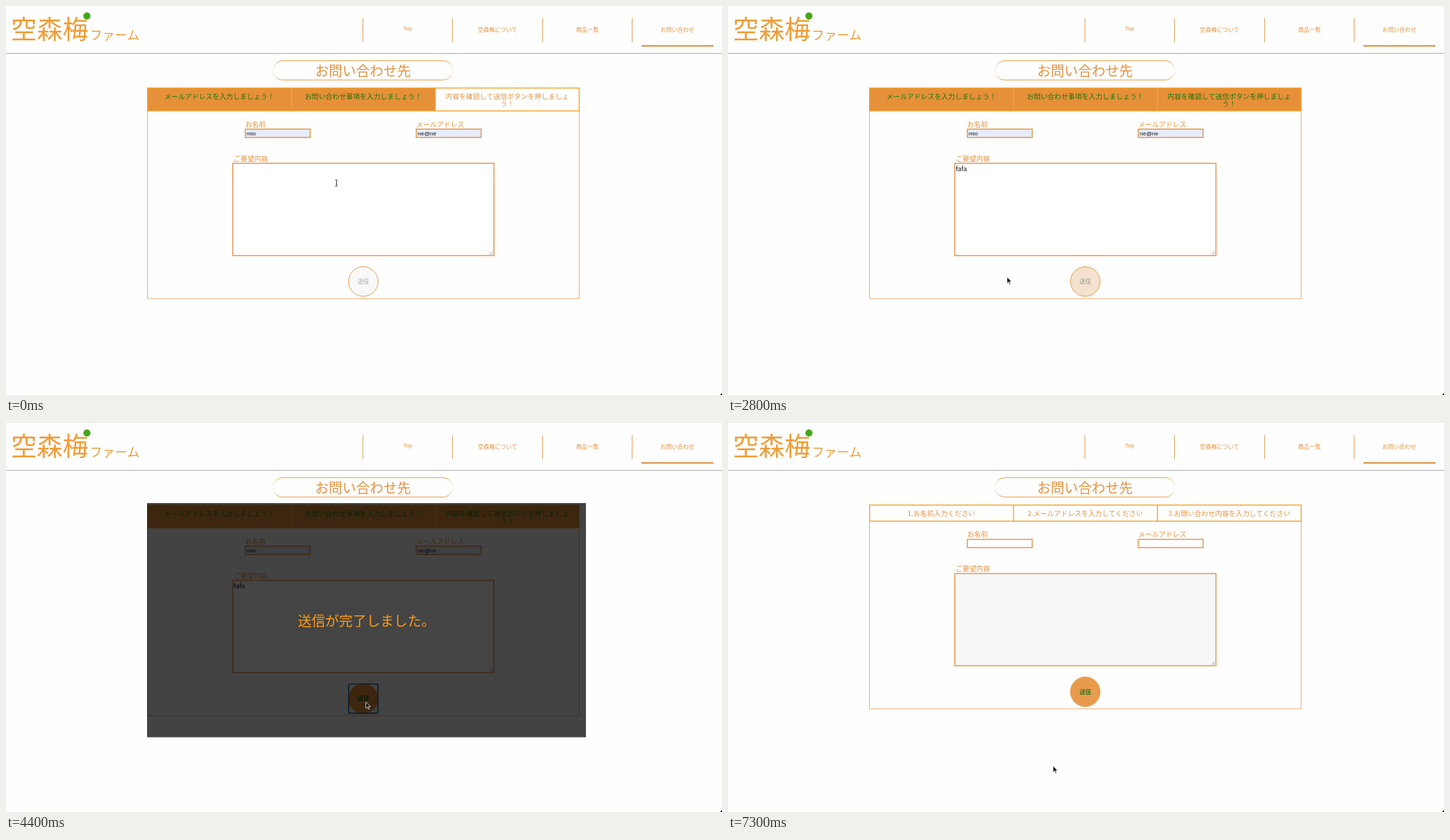
Recreate the animation shown at these times as an HTML page. Size 1000 by 544 pixels, loop 7.4 s.

```html
<!DOCTYPE html>
<html lang="ja">
<head>
<meta charset="utf-8">
<title>お問い合わせ</title>
<style>
  html, body { margin: 0; width: 100%; height: 100%; overflow: hidden; background: #fefefe; }
  svg { position: absolute; left: 0; top: 0; width: 1000px; height: 544px; }
  text { font: 9.6px "Noto Sans CJK JP", "Noto Sans CJK", sans-serif; fill: #e3923f; }
  .pill { position: absolute; left: 373px; top: 76px; width: 251px; height: 28px; box-sizing: border-box;
    border: 0 solid #e9a557; border-width: 1px 0; border-radius: 14px; }
  .mid { text-anchor: middle; }
  .nav text { font-size: 7.9px; }
  .nav .latin, .latin { font-family: "Liberation Sans", Arial, sans-serif; font-size: 8px; }
  .done text { fill: #157a0c; font-weight: 500; }
  .tabs rect { stroke: #f2a535; stroke-width: 1.4; fill: #fff; }
  .tabs .done rect { fill: #e69039; }
  .field { stroke: #e29a55; stroke-width: 1.5; fill: #fff; }
  .entry { fill: #111; }
</style>
</head>
<body>
<div class="pill"></div>
<svg viewBox="0 0 1000 544">
  <text x="7" y="46" style="font-size:36px;fill:#f09c35">空森梅</text>
  <text x="117" y="47" style="font-size:17.5px;fill:#f09c35">ファーム</text>
  <circle cx="113" cy="14" r="5" fill="#45a818"/>

  <g class="nav mid">
    <path d="M498.5 17V50.5M623.5 17V50.5M749.5 17V50.5M874.5 17V50.5" stroke="#e0a463"/>
    <text class="latin" x="561" y="34">Top</text>
    <text x="686.5" y="36">空森梅について</text>
    <text x="812" y="36">商品一覧</text>
    <text x="937.7" y="36">お問い合わせ</text>
    <path d="M887.5 55.8H988" stroke="#dc8c3b" stroke-width="2"/>
  </g>
  <path d="M0 66.3H1000" stroke="#b9b9b9" stroke-width="1.3"/>
  <rect x="998" y="542" width="2" height="2" fill="#333"/>

  <text class="mid" x="498.5" y="98.3" style="font-size:19.1px;font-weight:500">お問い合わせ先</text>

  <g id="fields">
    <path d="M197.5 140V409.3H800.5V140" fill="none" stroke="#e9b277"/>
    <text x="334" y="168.7">お名前</text>
    <text x="573" y="168.7">メールアドレス</text>
    <text x="318" y="216.7">ご要望内容</text>
    <rect class="field auto" x="334.3" y="172.2" width="90.6" height="11.6"/>
    <rect class="field auto" x="573" y="172.2" width="90.6" height="11.6"/>
    <rect class="field" id="area" x="316.7" y="220" width="364.8" height="129"/>
    <path d="M675.5 347.5L680 343M678 347.5L680 345.5" stroke="#999" stroke-width=".8"/>
    <g id="entries">
      <text class="latin entry" x="336" y="180.6">mio</text>
      <text class="latin entry" x="575" y="180.6">ne@ne</text>
    </g>
    <text id="typed" class="entry" x="318" y="231" style="font-size:9px"></text>
    <circle id="button" cx="499" cy="385.3" r="20.7" stroke="#e7a152"/>
    <text id="send" class="mid" x="499" y="388.4" style="font-size:8px;font-weight:500">送信</text>
    <rect id="ring" x="478.6" y="365" width="40.8" height="40.8" rx="2" fill="none" stroke="#336f96" stroke-width="1.7"/>
  </g>

  <g class="tabs mid" id="progressTabs">
    <g class="done">
      <rect x="197.7" y="114.7" width="201" height="32"/>
      <text x="298" y="130">メールアドレスを入力しましょう！</text>
      <rect x="398.7" y="114.7" width="201" height="32"/>
      <text x="499" y="130">お問い合わせ事項を入力しましょう！</text>
    </g>
    <g id="lastTab">
      <rect x="599.7" y="114.7" width="200.8" height="32"/>
      <text x="700" y="130">内容を確認して送信ボタンを押しましょ</text>
      <text x="700" y="139.7">う！</text>
    </g>
  </g>
  <g class="tabs mid" id="emptyTabs">
    <rect x="197.7" y="114.7" width="201" height="22.6"/>
    <text x="298" y="130">1.お名前入力ください</text>
    <rect x="398.7" y="114.7" width="201" height="22.6"/>
    <text x="499" y="130">2.メールアドレスを入力してください</text>
    <rect x="599.7" y="114.7" width="200.8" height="22.6"/>
    <text x="700" y="130">3.お問い合わせ内容を入力してください</text>
  </g>

  <g id="overlay">
    <rect x="197" y="112" width="613" height="327.5" fill="#000" fill-opacity=".735"/>
    <text x="407.5" y="284.2" style="font-size:19.2px;fill:#ff9c10">送信が完了しました。</text>
  </g>

  <path id="arrow" d="M0 0V9L2.1 7.1L3.6 10.4L5.1 9.7L3.6 6.6H6.4Z" fill="#111" stroke="#fff" stroke-width=".7"/>
  <path id="beam" d="M-1.8 -4.5Q0 -4.5 0 -3.2Q0 -4.5 1.8 -4.5M0 -3.2V3.2M-1.8 4.5Q0 4.5 0 3.2Q0 4.5 1.8 4.5M-1 1.6H1" fill="none" stroke="#333" stroke-width=".9"/>
</svg>
<script>
  const LOOP = 7400, BLUR = 2650, PRESS = 4200, SENT = 4400, RESET = 7300;
  const KEY_TIMES = [1900, 2020, 2150, 2270];
  // time, x, y of the pointer
  const PATH = [
    [0, 461.5, 247.5], [300, 461.5, 247.5], [1500, 389.7, 224.5], [2350, 389.7, 224.5],
    [2600, 389.7, 379], [3000, 389.7, 379], [3700, 502.6, 390], [4800, 502.6, 390],
    [5500, 458, 458], [6000, 455, 474], [6300, 454, 479.5], [LOOP, 454, 479.5]
  ];
  const $ = id => document.getElementById(id);
  const show = (id, on) => $(id).style.display = on ? '' : 'none';
  const smooth = (t, start, length) => {
    const p = Math.min(1, Math.max(0, (t - start) / length));
    return p * p * (3 - 2 * p);
  };
  const mix = (a, b, p) => `rgb(${a.map((v, i) => Math.round(v + (b[i] - v) * p))})`;

  function pointerAt(t) {
    const i = PATH.findIndex(point => point[0] > t);
    const [t0, x0, y0] = PATH[i - 1], [t1, x1, y1] = PATH[i];
    const p = smooth(t, t0, t1 - t0);
    return [x0 + (x1 - x0) * p, y0 + (y1 - y0) * p];
  }

  function render(t) {
    const reset = t >= RESET;
    const enabled = smooth(t, BLUR, 500) - smooth(t, RESET - 100, 500) * reset;
    show('emptyTabs', reset);
    show('progressTabs', !reset);
    show('entries', !reset);
    show('ring', t >= PRESS && !reset);
    show('overlay', t >= SENT && !reset);
    $('lastTab').setAttribute('class', t >= BLUR ? 'done' : '');
    $('fields').setAttribute('transform', `translate(0 ${reset ? -9.5 : 0})`);
    $('area').style.fill = reset ? '#f7f7f8' : '#fff';
    document.querySelectorAll('.auto').forEach(el => el.style.fill = reset ? '#fff' : '#e6ecfa');
    $('typed').textContent = reset ? '' : 'fafa'.slice(0, KEY_TIMES.filter(k => t >= k).length);
    $('button').style.fill = mix([248, 248, 248], [230, 144, 57], enabled);
    $('send').style.fill = mix([164, 164, 164], [21, 112, 12], enabled);
    $('send').style.fontWeight = enabled > .5 ? 700 : 500;

    const [x, y] = pointerAt(t);
    const inArea = y > 218 && y < 349;
    show('beam', inArea);
    show('arrow', !inArea);
    $(inArea ? 'beam' : 'arrow').setAttribute('transform', `translate(${x} ${y})`);
  }

  const start = performance.now();
  function tick() {
    render((performance.now() - start) % LOOP);
    requestAnimationFrame(tick);
  }
  tick();
</script>
</body>
</html>
```
